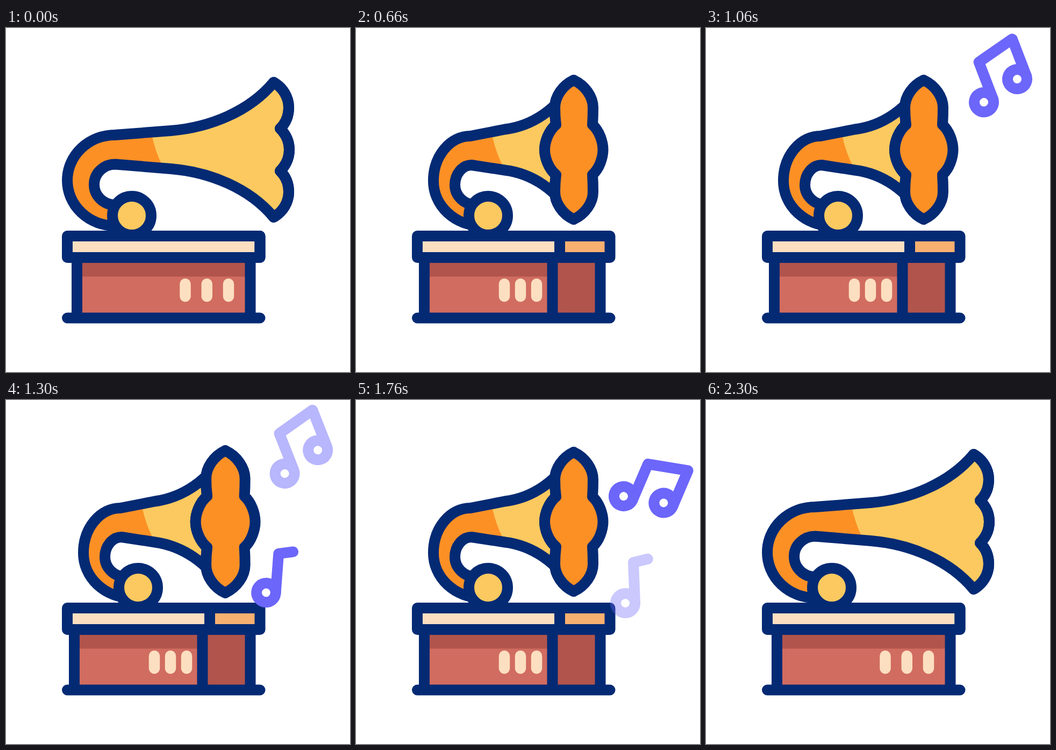
Write an HTML page that moves like this. It is 640 by 640 pixels and loops after 2.4 s.

```html
<!DOCTYPE html>
<html lang="en">
<head>
<meta charset="utf-8">
<title>Gramophone</title>
<style>
  html, body { margin: 0; width: 100%; height: 100%; overflow: hidden; background: #fff; }
  svg { display: block; width: 100%; height: 100%; }
  .line { fill: none; stroke: #042a74; stroke-width: 20; stroke-linecap: round; stroke-linejoin: round; }
  .note { fill: none; stroke: #6c66fa; stroke-width: 20; stroke-linecap: round; stroke-linejoin: round; }
  .note circle { fill: #fff; }
</style>
</head>
<body>
<svg viewBox="0 0 640 640">
  <defs>
    <clipPath id="hornClip"><path id="hornShape"/></clipPath>
  </defs>

  <path id="hornFill" fill="#fbc95f"/>
  <path id="tube" fill="#fc9025" clip-path="url(#hornClip)"/>
  <path id="hornLine" class="line"/>
  <circle id="ball" class="line" cy="349" r="36" style="fill:#fbc95f"/>
  <path id="mouth" class="line" style="fill:#fc9025"/>

  <rect id="front" y="430" height="110" fill="#d16c60"/>
  <rect id="shade" y="430" height="32.5" fill="#b1544c"/>
  <rect id="side" y="430" height="110" fill="#b1544c"/>
  <g id="slots" fill="#fcdfc0">
    <rect y="466" width="20.5" height="43.5" rx="10.25"/>
    <rect y="466" width="20.5" height="43.5" rx="10.25"/>
    <rect y="466" width="20.5" height="43.5" rx="10.25"/>
  </g>
  <path id="posts" class="line"/>
  <path class="line" d="M114 539.5H472.5"/>

  <rect x="114" y="387" width="358.5" height="40" fill="#fcdfc0"/>
  <rect id="slabSide" y="387" height="40" fill="#f8b070"/>
  <path id="slabEdge" class="line"/>
  <rect class="line" x="114" y="387" width="358.5" height="40"/>

  <g id="noteA" class="note">
    <path d="M18 0V-73L91.3 -91V-18"/>
    <circle r="18"/><circle cx="73.3" cy="-18" r="18"/>
  </g>
  <g id="noteB" class="note">
    <path d="M18 0V-75L45 -80.5"/>
    <circle r="18"/>
  </g>
  <g id="noteC" class="note">
    <path d="M18 0V-73L91.3 -91V-18"/>
    <circle r="18"/><circle cx="73.3" cy="-18" r="18"/>
  </g>
</svg>
<script>
const LOOP = 2400, AXIS = 226.5;
const $ = id => document.getElementById(id);
const set = (el, attrs) => { for (const k in attrs) el.setAttribute(k, attrs[k]); };
const clamp = v => Math.min(1, Math.max(0, v));
const mix = (a, b, k) => a + (b - a) * k;
const ease = v => { v = clamp(v); return v * v * (3 - 2 * v); };
const path = (cmd, pts) => cmd + pts.map(q => q.map(v => v.toFixed(2)).join(" ")).join(" ");
const flip = ([x, y]) => [x, 2 * AXIS - y];

// Each note flies out of the mouth: birth time, pivot, end point, turn
const notes = [
  { el: $("noteA"), born: 665, pivot: [45, -46], end: [543.6, 77.6], turn: [40, -21.5] },
  { el: $("noteB"), born: 1070, pivot: [20, -30], end: [519.8, 347.2], turn: [40, -2.3] },
  { el: $("noteC"), born: 1415, pivot: [45, -46], end: [561.2, 152], turn: [79, 21.5] }
];

// One scalloped side of the mouth, from top tip to bottom tip (first point excluded)
function scallop(tip, lobe, notch, mid) {
  const [tx, ty] = tip, [nx, ny] = notch;
  const upper = [
    [mix(tx, lobe, .6), ty + 10], [lobe, 128], [lobe, 148],
    [lobe, 163], [mix(nx, lobe, .65), ny - 10], [nx, ny],
    [mix(nx, mid, .65), ny + 11], [mid, 212], [mid, AXIS]
  ];
  const lower = [tip, ...upper.slice(0, -1)].reverse().map(flip);
  return [...upper, ...lower];
}

// p turns the tube, m turns the mouth
function drawHorn(p, m, swell) {
  const grow = ([x, y]) => [274 + (x - 274) * swell, AXIS + (y - AXIS) * swell];
  const tip = [498 - 93 * m, 101 - 4 * m ** 6];
  const ny = 187 - 7 * m;
  const left = scallop(tip, 526 - 178 * m + 22 * m * m, [510 - 138 * m, ny], 527 - 176 * m).map(grow);
  const right = scallop(tip, 526 - 138 * m + 53 * m * m, [510 - 110 * m + 40 * m * m, ny], 527 - 140.5 * m + 73 * m * m).map(grow);
  const top = grow(tip);

  const neck = [307 - 30 * p, 191 - 2.5 * p];
  const span = tip[0] - neck[0];
  const cone = [[neck[0] + span * .38, neck[1] - 6], [neck[0] + span * .765, 155 - 2 * p]].map(grow);

  // Bend: the lower quarter keeps its width, the upper one narrows
  const ox = 203 + 10 * p, oTop = 199 + 2 * p, oRy = (368 - oTop) / 2;
  const ix = 203 + 12 * p, iTop = 253.5 + 1.5 * p, iRy = (329 - iTop) / 2;
  const oLeft = 114 + 30 * p, iLeft = 164 + 20 * p;
  const horn =
    `M${oLeft + 89} 368A89 ${oRy} 0 0 1 ${oLeft} ${368 - oRy}A${ox - oLeft} ${oRy} 0 0 1 ${ox} ${oTop}` +
    path("L", [neck]) + path("C", [...cone, top]) + path("C", left) +
    path("C", [...cone.map(flip).reverse(), flip(neck)]) +
    `L${ix} ${iTop}A${ix - iLeft} ${iRy} 0 0 0 ${iLeft} ${329 - iRy}A39 ${iRy} 0 0 0 ${iLeft + 39} 329Z`;
  for (const id of ["hornShape", "hornFill", "hornLine"]) set($(id), { d: horn });

  const s = -18 * p;
  set($("tube"), { d: `M0 150H${269 + s}L${270 + s} 193Q${277 + s} 230 ${292 + s} 258V400H0Z` });

  // Down the right side, back up the left
  const back = [top, ...left.slice(0, -1)].reverse();
  set($("mouth"), { d: path("M", [top]) + path("C", right) + path("C", back) + "Z" });
  set($("ball"), { cx: 234 + 12 * p });
}

function drawBox(p) {
  const l = 132 - 5 * p, d = 454.5 - 89 * p, edge = 472.5 - 93.5 * p;
  set($("front"), { x: l, width: d - l });
  set($("shade"), { x: l, width: d - l });
  set($("side"), { x: d, width: 454.5 - d });
  set($("posts"), { d: `M${l} 437V530M${d} 437V530M454.5 437V530` });
  set($("slabSide"), { x: edge, width: 472.5 - edge });
  set($("slabEdge"), { d: `M${edge} 387V427` });
  [...$("slots").children].forEach((slot, i) =>
    set(slot, { x: mix(333.5 + 40.25 * i, 276 + 30 * i, p) - 10.25 }));
}

function drawNote(n, t) {
  const age = t - n.born;
  const fade = 1 - clamp((age - 400) / 450);
  if (age <= 0 || fade <= 0) return set(n.el, { visibility: "hidden" });
  const e = 1 - (1 - clamp(age / 500)) ** 3;
  const size = 1 - (1 - e) ** 2.4;
  const x = mix(430, n.end[0], e), y = mix(239, n.end[1], e);
  const turn = mix(n.turn[0], n.turn[1], e);
  set(n.el, {
    visibility: "visible",
    opacity: fade,
    transform: `translate(${x} ${y}) rotate(${turn}) scale(${size}) translate(${-n.pivot[0]} ${-n.pivot[1]})`
  });
}

function draw(t) {
  const open = ease((t - 100) / 500);
  const p = open - ease((t - 1800) / 500);
  const m = open - ease((t - 1785) / 515);
  const pulse = notes.reduce((sum, n) => {
    const k = (t - n.born) / 300;
    return sum + (k > 0 && k < 1 ? Math.sin(Math.PI * k) ** 2 : 0);
  }, 0);
  drawHorn(p, m, 1 + .05 * pulse);
  drawBox(p);
  notes.forEach(n => drawNote(n, t));
}

const start = performance.now();
function tick() {
  draw((performance.now() - start) % LOOP);
  requestAnimationFrame(tick);
}
tick();
</script>
</body>
</html>
```
